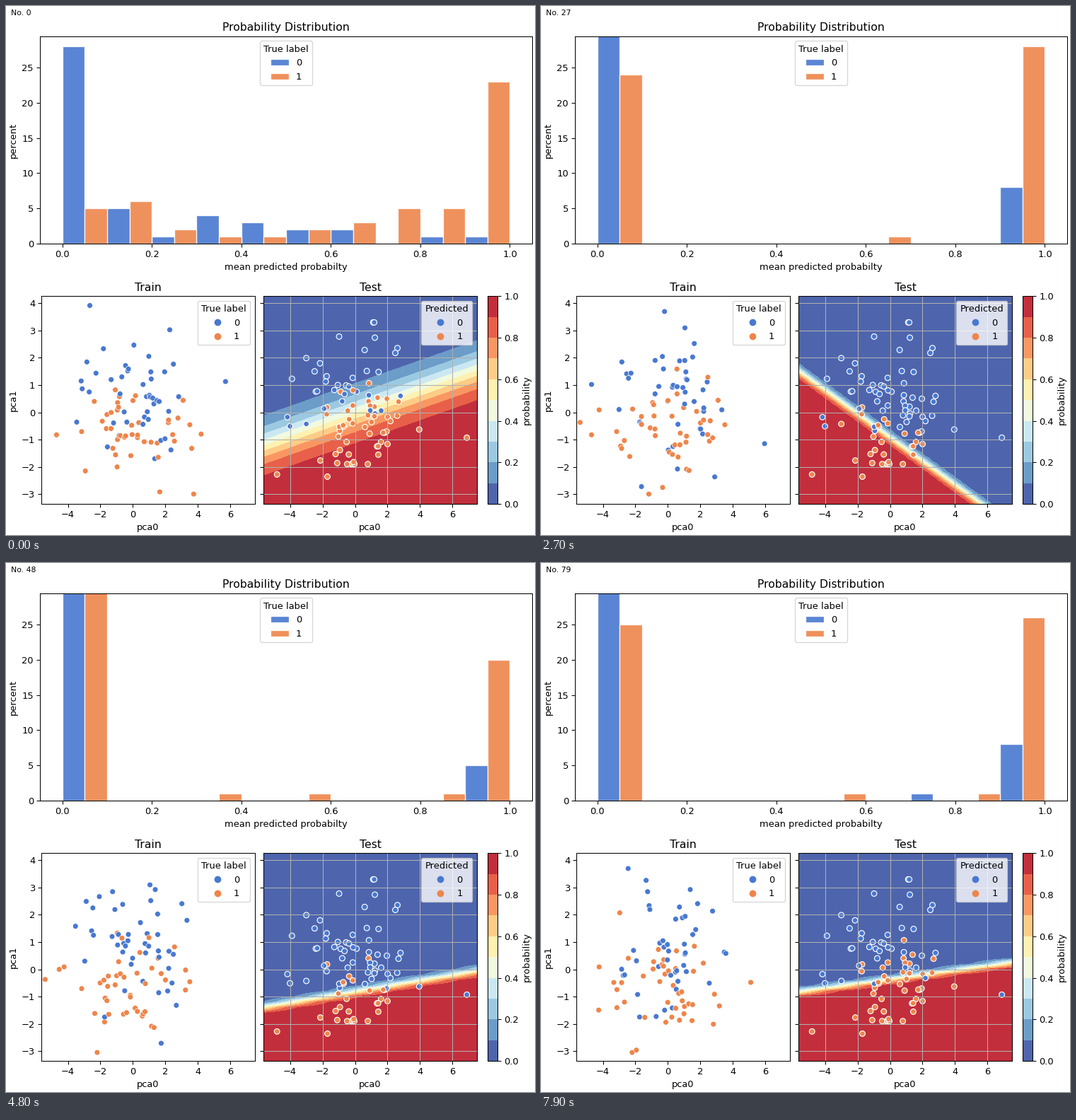
A matplotlib script for the animation above (8000 ms loop, 748x748 px).

```python
import matplotlib.pyplot as plt
import numpy as np
from matplotlib.animation import FuncAnimation
from matplotlib.cm import ScalarMappable
from matplotlib.colors import ListedColormap
from matplotlib.lines import Line2D

SIZE, FRAMES = 748, 80
COLORS = np.array(["#4878d0", "#ee854a"])
X_RANGE, Y_RANGE = (-5.62, 7.49), (-3.36, 4.26)

# Decision line at a few key moments; everything between is interpolated.
KEYS = [0, 12, 27, 36, 48, 69, 79]
SLOPE = [.21, .033, -.434, -.642, .101, .153, .082]
OFFSET = [-.044, -1.02, -.94, -1.51, -.835, -.62, -.38]
STEEPNESS = [2, 11, 8, 7.1, 10.5, 12, 13]

# Per class: samples, count in the top bin at the key moments, first middle bins.
CLASS_SIZE = [47, 53]
TOP_BIN = [[1, 5, 8, 7, 5, 5, 8], [23, 21, 28, 19, 20, 21, 26]]
FIRST_MIDDLE = [[5, 1, 4, 3, 2, 2, 0, 1], [6, 2, 1, 1, 2, 3, 5, 5]]

TEST_OUTLIERS = [(6.88, -.93), (3.95, -.63), (-4.8, -2.28), (1.12, 3.3), (1.18, 3.3),
                 (-.98, 2.78), (1.22, 2.74), (2.48, 2.18), (-3, 1.99), (-1.7, -2.36)]
# Long-lived training points: x, y, label, first and last frame.
TRAIN_OUTLIERS = [(-2.65, 3.92, 0, 0, 20), (5.7, 1.13, 0, 0, 18), (4.2, -.8, 1, 0, 16),
                  (-5.4, -.37, 1, 9, 60), (1.05, 3.1, 0, 22, 52), (5.95, -1.15, 0, 21, 42),
                  (-2.2, -3.05, 1, 31, 79), (-1.25, 2.85, 0, 45, 79), (5.1, -.48, 1, 60, 79)]

rng = np.random.default_rng(11)


def at(values, n):
    return np.interp(n, KEYS, values)


def cloud(mean, spread, low, high, count):
    return np.clip(rng.normal(mean, spread, (count, 2)), low, high)


def drifting_cloud(mean, spread, count=43, turnover=.06):
    """A cloud for every frame; each step draws a few of its points anew."""
    def draw():
        return cloud(mean, spread, (-4.7, -3), (4.8, 3.7), count)
    history = [draw()]
    for _ in range(FRAMES - 1):
        renew = rng.random((count, 1)) < turnover
        history.append(np.where(renew, draw(), history[-1]))
    return history


train_clouds = [drifting_cloud((0, .7), (1.8, 1.3)),
                drifting_cloud((-.3, -.75), (1.8, .95))]
test_points = np.vstack([cloud((-.2, -.05), (1.5, 1.05), (-4.2, -1.9), (2.8, 2.5), 76),
                         TEST_OUTLIERS])
test_bias = rng.normal(.3, .65, len(test_points))
strays = [[rng.multinomial(rng.integers(0, 4), np.full(8, 1 / 8)) for _ in range(2)]
          for _ in range(FRAMES)]


def train_state(n):
    points = list(train_clouds[0][n]) + list(train_clouds[1][n])
    labels = [0] * len(train_clouds[0][n]) + [1] * len(train_clouds[1][n])
    for x, y, label, first, last in TRAIN_OUTLIERS:
        if first <= n <= last:
            points.append((x, y))
            labels.append(label)
    order = np.argsort([x for x, _ in points])
    return np.array(points)[order], COLORS[np.array(labels)[order]]


def test_colors(n):
    x, y = test_points.T
    score = at(OFFSET, n) + .5 * at(SLOPE, n) * x - y + test_bias
    return COLORS[(score > 0).astype(int)]


def bin_counts(label, n):
    """Soft predictions fade into the two end bins, leaving a few strays."""
    middle = np.rint(np.array(FIRST_MIDDLE[label]) * np.exp(-n / 3))
    if n:
        middle += strays[n][label]
    top = round(at(TOP_BIN[label], n))
    return [CLASS_SIZE[label] - middle.sum() - top, *middle, top]


fig = plt.figure(figsize=(8, 8), dpi=SIZE / 8)


def panel(left, top, right, bottom):
    return fig.add_axes([left / SIZE, 1 - bottom / SIZE,
                         (right - left) / SIZE, (bottom - top) / SIZE])


hist_ax = panel(48, 43, 744.1, 336)
train_ax = panel(50.3, 410.4, 351.5, 704)
test_ax = panel(364.4, 410.4, 665.6, 704)
bar_ax = panel(680.6, 410.4, 695.3, 704)
counter = fig.text(.01, 1 - 13 / SIZE, "", fontsize="small")

# Histogram
hist_ax.set(title="Probability Distribution", xlabel="mean predicted probabilty",
            ylabel="percent", xlim=(-.05, 1.05), ylim=(0, 29.4))
bars = [hist_ax.bar(np.arange(10) / 10 + .05 * i, np.zeros(10), .05, align="edge",
                    color=color, edgecolor="white", alpha=.9, label=str(i))
        for i, color in enumerate(COLORS)]
hist_ax.legend(title="True label", loc="upper center")

# Scatter panels
dots = [Line2D([], [], ls="", marker="o", color=color, markersize=7.5,
               markeredgewidth=0) for color in COLORS]
for ax, title, legend_title in ((train_ax, "Train", "True label"),
                                (test_ax, "Test", "Predicted")):
    ax.set(title=title, xlabel="pca0", xlim=X_RANGE, ylim=Y_RANGE,
           xticks=range(-4, 7, 2), yticks=range(-3, 5))
    ax.legend(dots, ["0", "1"], title=legend_title, loc="upper right")
train_ax.set_ylabel("pca1")
test_ax.tick_params(labelleft=False)
test_ax.grid(True)
train_dots = train_ax.scatter([], [], s=36, edgecolors="white", linewidths=.5)
test_dots = test_ax.scatter(*test_points.T, s=36, edgecolors="white", linewidths=.9)

# Probability field
levels = np.linspace(0, 1, 11)
bands = plt.get_cmap("RdYlBu_r")(levels[:-1] + .05)[:, :3] * .9 + .1
colorbar = fig.colorbar(ScalarMappable(plt.Normalize(0, 1), ListedColormap(bands)),
                        cax=bar_ax, ticks=np.linspace(0, 1, 6))
colorbar.set_label("probability")
grid_x, grid_y = np.meshgrid(np.arange(-5.7, 7.7, .2), np.arange(-3.4, 4.5, .2))
field = None


def update(n):
    global field
    counter.set_text(f"No. {n}")
    for label, container in enumerate(bars):
        for bar, count in zip(container, bin_counts(label, n)):
            bar.set_height(count)

    points, colors = train_state(n)
    train_dots.set_offsets(points)
    train_dots.set_facecolor(colors)
    test_dots.set_facecolor(test_colors(n))

    if field is not None:
        field.remove()
    steepness = np.exp(at(np.log(STEEPNESS), n))
    logit = steepness * (at(OFFSET, n) + at(SLOPE, n) * grid_x - grid_y)
    field = test_ax.contourf(grid_x, grid_y, 1 / (1 + np.exp(-logit)), levels,
                             colors=bands, zorder=.5)
    test_ax.set(xlim=X_RANGE, ylim=Y_RANGE)


animation = FuncAnimation(fig, update, frames=FRAMES, interval=100,
                          init_func=lambda: update(0), repeat=True, repeat_delay=0)
plt.show()
```
